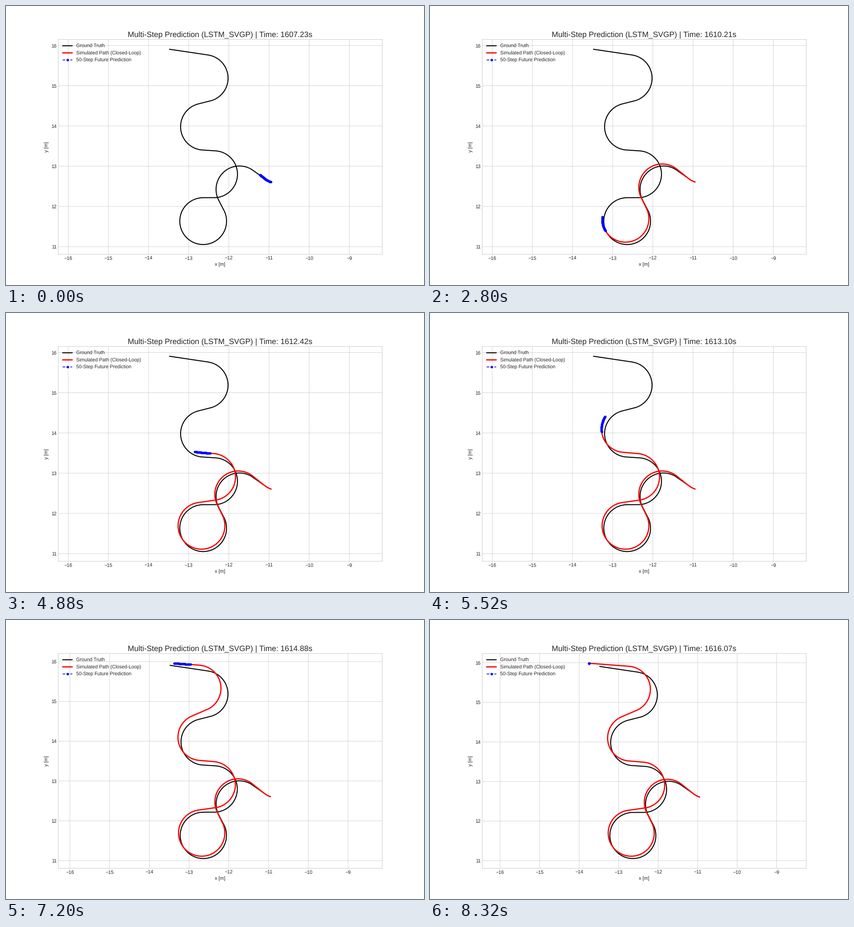
A matplotlib script that plays this animation: 917x611 px, repeating every 8.4 s.

```python
import numpy as np
import matplotlib.pyplot as plt
from matplotlib.animation import FuncAnimation
from matplotlib.ticker import MultipleLocator

W, H, DPI = 917, 611, 76.4
FRAMES, INTERVAL = 105, 80
STRIDE, HORIZON = 17, 50      # steps per frame, steps predicted ahead
T0, DT = 1607.232, 0.005
RADIUS = 0.5823               # turning circle in metres
SPEED, ACCEL, BRAKE = 1.35, 0.0435, 0.06

plt.rcParams.update({
    "font.family": "Liberation Sans",
    "text.hinting": "none",
    "text.color": ".15",
    "path.snap": False,
    "axes.labelcolor": ".15",
    "axes.edgecolor": ".8",
    "axes.linewidth": 1,
    "axes.axisbelow": True,
    "axes.grid": True,
    "grid.color": ".8",
    "grid.linewidth": 0.8,
    "xtick.color": ".15",
    "ytick.color": ".15",
    "xtick.major.size": 0,
    "ytick.major.size": 0,
    "lines.solid_capstyle": "round",
    "legend.frameon": False,
})

# Points are complex numbers x + iy in metres.
START = -10.951 + 12.607j
FIRST_HUB = -10.753 + 13.153j
TRUTH_HUBS = [FIRST_HUB, -11.737 + 12.423j, -12.640 + 11.635j,
              -12.368 + 12.800j, -12.620 + 13.983j, -12.603 + 15.188j]
TRUTH_END = -13.480 + 15.907j
SIM_HUBS = [FIRST_HUB, -11.768 + 12.473j, -12.682 + 11.694j,
            -12.417 + 12.907j, -12.697 + 14.099j, -12.779 + 15.330j]
SIM_END = -13.754 + 15.988j


def route(start, hubs, end):
    """Arcs around the hubs, alternately right and left, joined by tangents."""
    centres = [start, *hubs, end]
    radii = [0, *(-RADIUS * (-1) ** k for k in range(len(hubs))), 0]
    gaps = np.diff(centres)
    ratio = np.clip(np.diff(radii) / np.abs(gaps), -1, 1)
    headings = np.angle(gaps) - np.arcsin(ratio)
    parts = [[start]]
    for hub, r, h0, h1 in zip(hubs, radii[1:], headings, headings[1:]):
        side = np.sign(r)
        sweep = side * (side * (h1 - h0) % (2 * np.pi))
        parts.append(hub - 1j * r * np.exp(1j * (h0 + np.linspace(0, sweep, 200))))
    return np.concatenate([*parts, [end]])


def drive(path):
    """Sample the path at every time step: speed up gently, then stop softly."""
    s = np.r_[0, np.cumsum(np.abs(np.diff(path)))]
    t = np.arange(FRAMES * STRIDE) * DT
    cruise = SPEED * t + ACCEL * t ** 2 / 2
    dist = s[-1] - BRAKE * np.logaddexp(0, (s[-1] - cruise) / BRAKE)
    return np.interp(dist, s, path)


truth = route(START, TRUTH_HUBS, TRUTH_END)
sim = drive(route(START, SIM_HUBS, SIM_END))

fig, ax = plt.subplots(figsize=((W + 1e-6) / DPI, (H + 1e-6) / DPI), dpi=DPI)
ax.plot(truth.real, truth.imag, "k-", lw=2, label="Ground Truth")
driven, = ax.plot([], [], "r-", lw=2.5, label="Simulated Path (Closed-Loop)")
ahead, = ax.plot([], [], "b--o", lw=1.5, ms=4, label="50-Step Future Prediction")
ax.set_xlabel("x [m]")
ax.set_ylabel("y [m]")
title = ax.set_title("", fontsize=16)
ax.legend(loc="upper left")
ax.set_aspect("equal", adjustable="datalim")
for axis in (ax.xaxis, ax.yaxis):
    axis.set_major_locator(MultipleLocator(1))


def update(frame):
    i = frame * STRIDE
    past, future = sim[:i], sim[i:i + HORIZON]
    driven.set_data(past.real, past.imag)
    ahead.set_data(future.real, future.imag)
    title.set_text(f"Multi-Step Prediction (LSTM_SVGP) | Time: {T0 + i * DT:.2f}s")
    ax.relim()
    ax.autoscale(True)
    ax.autoscale_view()
    return driven, ahead, title


anim = FuncAnimation(fig, update, frames=FRAMES, interval=INTERVAL, repeat=True)
plt.show()
```
